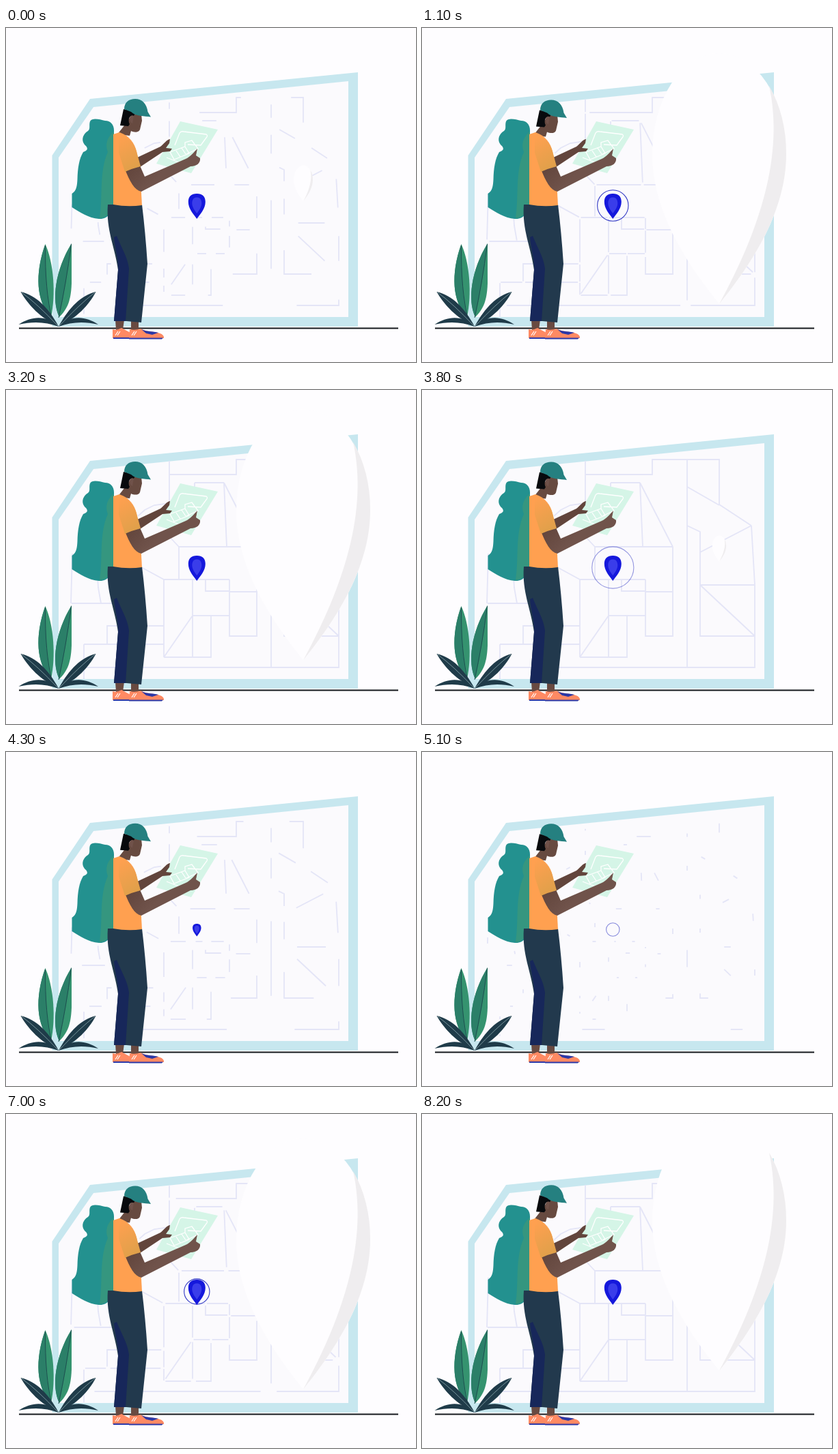
Write an HTML page with a canvas that moves like this. It is 600x490 px and loops after 8.3 s.

```html
<!DOCTYPE html>
<html lang="en">
<head>
<meta charset="utf-8">
<title>Traveller with map</title>
<style>
  html, body { margin: 0; width: 100%; height: 100%; overflow: hidden; background: #fefdff; }
  canvas { display: block; }
</style>
</head>
<body>
<canvas id="stage" width="600" height="490"></canvas>
<script>
const ctx = document.getElementById('stage').getContext('2d');
const LOOP = 8300, CYCLE = 6000, LEAD = 1200, BOB = 2500;
const PAPER = '#fefdff';

const clamp = x => Math.max(0, Math.min(1, x));
const progress = (t, from, to) => clamp((t - from) / (to - from));
const smooth = x => x * x * (3 - 2 * x);
const wave = (t, peak) => Math.cos(2 * Math.PI * (t - peak) / BOB);

function fill(color, d) {
  ctx.fillStyle = color;
  ctx.fill(new Path2D(d));
}
function stroke(color, width, d) {
  ctx.strokeStyle = color;
  ctx.lineWidth = width;
  ctx.stroke(new Path2D(d));
}
function gradient(x0, y0, x1, y1, a, b) {
  const g = ctx.createLinearGradient(x0, y0, x1, y1);
  g.addColorStop(0, a);
  g.addColorStop(1, b);
  return g;
}

// Street plan: every street is drawn outwards from its middle.
const streets = [];
function street(...points) {
  let length = 0;
  for (let i = 1; i < points.length; i++) {
    length += Math.hypot(points[i][0] - points[i - 1][0], points[i][1] - points[i - 1][1]);
  }
  streets.push({ length, path: new Path2D('M' + points.join('L')) });
}
function row(y, ...xs) {
  for (let i = 1; i < xs.length; i++) street([xs[i - 1], y], [xs[i], y]);
}
function column(x, ...ys) {
  for (let i = 1; i < ys.length; i++) street([x, ys[i - 1]], [x, ys[i]]);
}

function planEast() {
  column(388, 102, 142, 199, 407);
  column(407, 238, 286);
  column(487, 286, 361);
  row(286, 407, 487);
  street([388, 102], [435, 102], [435, 168]);
  street([388, 142], [435, 169]);
  street([435, 168], [482, 199]);
  street([482, 199], [407, 238]);
  street([482, 199], [487, 286]);
  street([388, 199], [407, 208], [407, 238]);
  street([407, 286], [487, 361]);
  street([407, 286], [407, 361], [487, 361]);
  street([388, 407], [487, 407], [487, 361]);
}
function planCentre() {
  column(239, 104, 124, 172);
  column(276, 136, 165);
  column(367, 230, 296);
  column(327, 278, 296, 331);
  column(273, 278, 331, 392);
  row(136, 276, 319);
  row(230, 253, 323, 367);
  row(278, 231, 273, 292, 327);
  row(296, 327, 367);
  row(331, 273, 300, 327);
  street([239, 124], [337, 124], [337, 102], [388, 102]);
  street([319, 136], [323, 230]);
  street([319, 136], [367, 230]);
  street([367, 296], [367, 361], [327, 361], [327, 331]);
  street([292, 278], [292, 295], [327, 295]);
  street([300, 331], [300, 392], [273, 392]);
}
function planWest() {
  column(231, 278, 346, 373, 392);
  column(253, 230, 278);
  column(114, 373, 407, 424);
  row(392, 231, 273);
  row(407, 114, 388);
  row(373, 114, 148, 231);
  row(346, 165, 231);
  row(313, 96, 160);
  street([231, 392], [273, 331]);
  street([148, 373], [148, 346], [165, 346]);
  street([97, 240], [95, 313]);
  street([134, 275], [135, 290], [139, 313]);
  street([193, 185], [203, 176], [217, 169], [239, 166]);
  street([238, 214], [253, 230]);
  street([198, 260], [231, 278]);
}
planEast();
planCentre();
planWest();

function drawStreets(part) {
  if (part <= 0) return;
  ctx.strokeStyle = '#e4e5f7';
  ctx.lineWidth = 1.8;
  for (const { length, path } of streets) {
    if (part < 1) {
      ctx.setLineDash([part * length, 2 * length]);
      ctx.lineDashOffset = -(1 - part) / 2 * length;
    }
    ctx.stroke(path);
  }
  ctx.setLineDash([]);
}

function drawBoard() {
  fill('#c7e7ef', 'M67.5 187L123 104 515 65V438H67.5Z');
  fill('#fbfafd', 'M77 190L128 116 501 78V424H77Z');
}

function drawWhitePin(t) {
  const size = smooth(progress(t, 1100, 1520)) * (1 - smooth(progress(t, 4660, 5085)));
  if (size <= 0) return;
  ctx.save();
  ctx.translate(435, 234);
  ctx.scale(size, size);
  ctx.translate(0, 156 + 15 * wave(t, 2350));
  fill(PAPER, 'M0 0C-40 -50 -98 -130 -98 -220A98 148 0 0 1 98 -220C98 -130 40 -50 0 0Z');
  fill('#efedef', 'M73 -320A98 148 0 0 1 98 -220C98 -130 40 -50 0 0C60 -110 95 -220 73 -320Z');
  ctx.restore();
}

function drawRing(t) {
  for (const start of [60, 1740, 4245]) {
    const age = t - start;
    if (age <= 0 || age > 950) continue;
    const radius = age * 0.0405;
    ctx.globalAlpha = clamp(age / 420) * (1 - progress(age, 560, 950));
    ctx.strokeStyle = '#3037c4';
    ctx.lineWidth = 1.1;
    ctx.beginPath();
    ctx.arc(279.3, 260.5, radius, 0, 2 * Math.PI);
    ctx.stroke();
    ctx.globalAlpha = 1;
  }
}

function drawBluePin(t) {
  const size = smooth(progress(t, 500, 900)) * (1 - smooth(progress(t, 5300, 5700)));
  if (size <= 0) return;
  ctx.save();
  ctx.translate(279.3, 261);
  ctx.scale(size, size);
  fill('#1518dc', 'M0 19C-5 12 -12.5 4 -12.5 -6C-12.5 -14 -8 -18 0 -18S12.5 -14 12.5 -6C12.5 4 5 12 0 19Z');
  fill('#3a3dea', 'M0 11C-3 7 -7 2 -7 -4C-7 -10 -4 -12.5 0 -12.5S7 -10 7 -4C7 2 3 7 0 11Z');
  ctx.restore();
}

function drawPlant() {
  fill('#35936f', 'M66 424C44 402 42 360 57.500 317C70 345 73 390 66 424Z');
  fill('#2b7f68', 'M66 424C44 402 42 360 57.500 317Q57 385 66 424Z');
  stroke('#1d4f50', 1, 'M57.500 319Q57 385 67 426');
  fill('#35936f', 'M78 424C66 400 72 355 96 316V375C95 400 90 412 78 424Z');
  fill('#2b7f68', 'M78 424C66 400 72 355 96 316Q88 375 78 424Z');
  stroke('#1d4f50', 1, 'M95.500 317Q88 375 77 425');
  const frond = '#1f3b49';
  fill(frond, 'M77 438C62 410 44 392 21.500 387C33 407 50 425 77 438Z');
  fill(frond, 'M77 438C92 410 110 392 131.500 387C121 407 104 425 77 438Z');
  fill(frond, 'M77 438C60 421 38 422 18.500 435C40 430 58 431 77 438Z');
  fill(frond, 'M77 438C94 421 116 422 135 435C114 430 96 431 77 438Z');
  stroke('#9db9bd', 0.7, 'M23 388Q46 405 76 437M130 388Q108 405 78 437');
}

function drawPack() {
  fill('#23918f', `M123 137C126 131 137 134 145 136C153 136 158 142 158 150V255
    C156 270 149 281 136 280C121 279 108 270 96.500 263V243C103 239 104 232 104.500 222
    C105 205 107 192 113 182C118 180 121 178 117 173C109 166 112 156 120 151C124 148 121 142 123 137Z`);
  fill('#35967f', 'M158 152V255C156 268 149 278 137 279C142 246 136 211 149 182C144 169 150 158 158 152Z');
}

function drawLegs() {
  const skin = '#694a41';
  fill(skin, 'M160 428H173L171 443H161ZM183 428H194V443H183Z');
  fill('#ff8a63', 'M156 442Q162 444 169 440L182 447V455H156Z');
  fill('#2b38a7', 'M157 454H182V456H157Z');
  fill('#ff8a63', 'M181 442Q189 444 197 441C205 447 229 444 231 453V455H180Z');
  fill('#2b38a7', 'M198 442C206 446 218 445 223 447L214 450 205 448ZM180 454.500H230L228 456.500H180Z');
  stroke('#fff', 1.2, 'M160 451L164 445M163 451L167 445M184 451L188 445M187 451L191 445');
  fill('#22394d', 'M149 259H199Q204 300 207 346L198 432 176 430H158L164 355C160 323 146 296 149 259Z');
  fill('#17275a', 'M162 305C170 325 178 336 180 353L175 430H158L164 355C165 340 159 322 158 307Z');
}

function drawMap() {
  fill('#d5f5e7', 'M255 137L310 149 271 213 220 199Z');
  stroke('#fff', 1.3, `M247 172L254 154Q256 151 260 152L293 156Q296 158 293 161L285 172 266 171
    M240 182L262 174 268 184 246 193ZM249 180L255 189M257 176L263 185
    M262 174V168L272 165 281 177 264 185M235 190L255 198`);
}

function drawHead(t) {
  ctx.save();
  ctx.translate(0, 0.75 * (1 + wave(t, 2400)));
  fill('#674a40', 'M177 138L186 124 198 126 199 136 196 149C194 154 187 153 183 151L181 158 163 156Z');
  fill('#080a0d', 'M172 119L190 123 187 129C180 127 178 136 181 141L179 144 167 143Z');
  fill('#70524a', 'M187 129C180 125 179 138 185 140Z');
  fill('#258080', 'M173 119C173 109 180 104 189 104C199 104 206 111 207.500 123L212 130.500C203 129 190 130 183 123Z');
  ctx.restore();
}

function drawBody(t) {
  const skin = '#70534b', shade = '#62453c';
  fill(shade, 'M192 190L226 174C231 170 235 164 240 163L239 169 234 176 243 177 240 181 229 182 196 204Z');
  drawHead(t);
  fill('#ffa050', 'M157 156L166 153C181 158 188 169 191 181L196 207 199 260Q178 263 157 259Z');
  fill(gradient(174, 209, 202, 238, shade, skin),
    'M174 207L196 202 203 218 263 192C270 189 275 182 280 177L278 187 284 191C285 198 279 203 270 203L198 240C188 238 181 225 174 207Z');
  fill(gradient(164, 160, 192, 205, '#ffa050', '#dfa04a'),
    'M165 157C181 160 188 170 191 181L197 203Q185 206 174 211L165 183Z');
}

function drawScene(time) {
  const t = (time + LEAD) % CYCLE;
  ctx.fillStyle = PAPER;
  ctx.fillRect(0, 0, 600, 490);
  drawBoard();
  drawStreets(progress(t, 0, 2480) * (1 - progress(t, 5050, 6000)));
  drawWhitePin(t);
  drawRing(t);
  drawBluePin(t);
  stroke('#15181c', 2, 'M19 440.500H574');
  drawPlant();
  drawPack();
  drawLegs();
  drawMap();
  drawBody(t);
}

const begin = performance.now();
function tick() {
  const time = (performance.now() - begin) % LOOP;
  drawScene(Math.floor(time / 100) * 100);
  requestAnimationFrame(tick);
}
tick();
</script>
</body>
</html>
```
